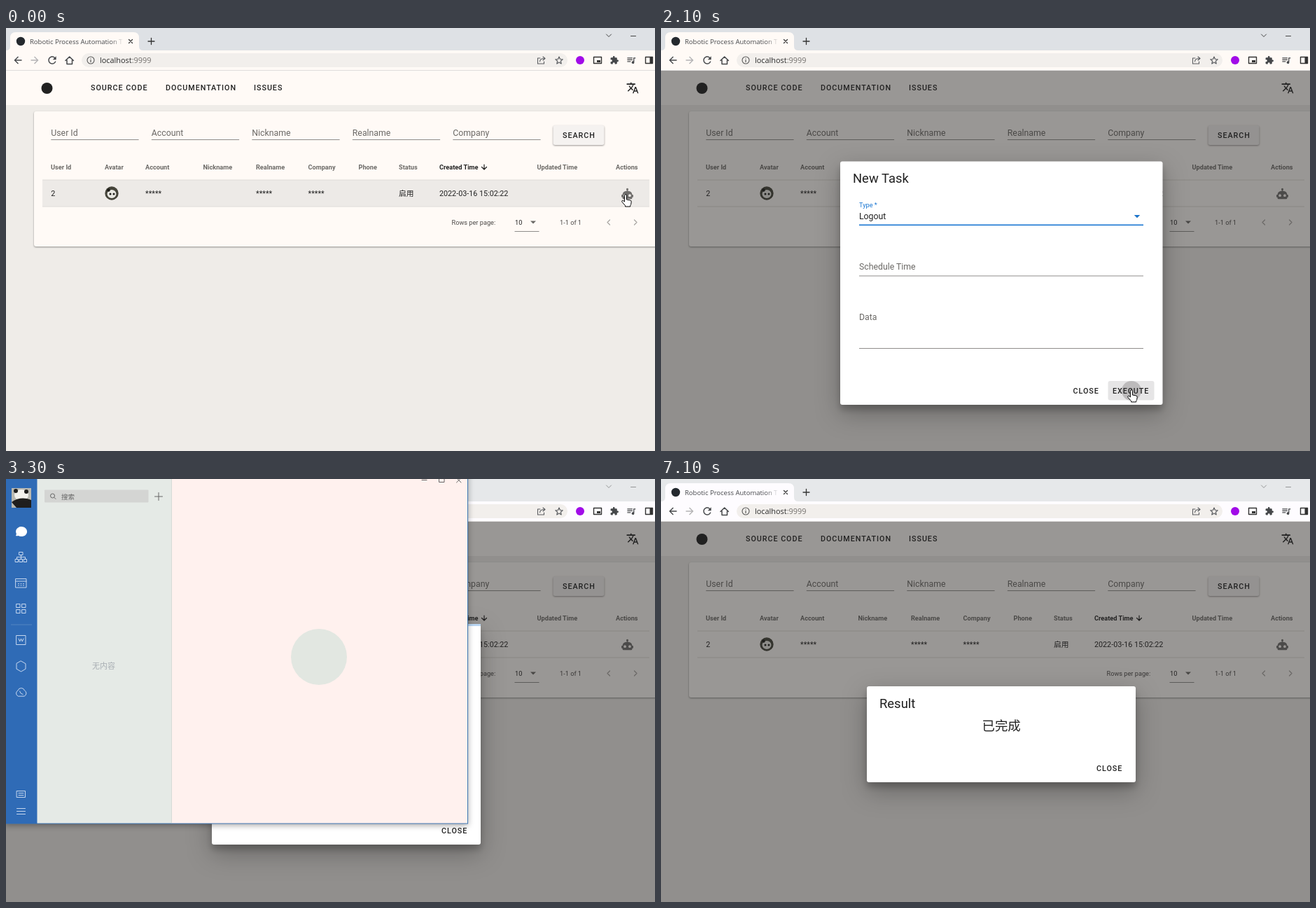
Write an HTML page that moves like this. It is 927 px wide and 604 px high and loops after 7.2 s.

```html
<!DOCTYPE html>
<html lang="en">
<head>
<meta charset="utf-8">
<title>Task console</title>
<style>
  html, body { margin: 0; width: 100%; height: 100%; overflow: hidden; }
  svg { display: block; width: 927px; height: 604px; font-family: Roboto, 'Noto Sans CJK SC', 'Noto Sans CJK', sans-serif; }
  text { white-space: pre; }
  .ui { font-family: 'Open Sans', 'Noto Sans', sans-serif; }
  .btn { font-weight: 500; letter-spacing: .0893em; }
  .line { fill: none; stroke-linecap: round; stroke-linejoin: round; }
  .card { filter: drop-shadow(0 1px 1px rgba(0,0,0,.4)); }
  .dialog { filter: drop-shadow(0 7px 5px rgba(0,0,0,.2)) drop-shadow(0 11px 17px rgba(0,0,0,.28)); }
  .menu { filter: drop-shadow(0 2px 3px rgba(0,0,0,.3)); }
  .window { filter: drop-shadow(0 2px 4px rgba(0,0,0,.35)); }
</style>
</head>
<body>
<svg id="stage" viewBox="0 0 927 604"></svg>
<script>
const INK = '#212121', SOFT = '#6b6966', RULE = '#8f8d8b', BLUE = '#1976d2';
const paths = {
  back: 'M20 11H7.83l5.59-5.59L12 4l-8 8 8 8 1.41-1.41L7.83 13H20z',
  reload: 'M17.65 6.35C16.2 4.9 14.21 4 12 4c-4.42 0-7.99 3.58-7.99 8s3.57 8 7.99 8c3.73 0 6.84-2.55 7.73-6h-2.08c-.82 2.33-3.04 4-5.65 4-3.31 0-6-2.69-6-6s2.69-6 6-6c1.66 0 3.14.69 4.22 1.78L13 11h7V4z',
  puzzle: 'M20.5 11H19V7c0-1.1-.9-2-2-2h-4V3.5a2.5 2.5 0 0 0-5 0V5H4c-1.1 0-2 .9-2 2v3.8h1.5a2.7 2.7 0 0 1 0 5.4H2V20c0 1.1.9 2 2 2h3.8v-1.5a2.7 2.7 0 0 1 5.4 0V22H17c1.1 0 2-.9 2-2v-4h1.5a2.5 2.5 0 0 0 0-5z',
  queue: 'M15 6H3v2h12zm0 4H3v2h12zM3 16h8v-2H3zM17 6v8.18a3 3 0 1 0 2 2.82V8h3V6z',
  translate: 'M12.87 15.07l-2.54-2.51.03-.03c1.74-1.94 2.98-4.17 3.71-6.53H17V4h-7V2H8v2H1v1.99h11.17C11.5 7.92 10.44 9.75 9 11.35 8.07 10.32 7.3 9.19 6.69 8h-2c.73 1.63 1.73 3.17 2.98 4.56l-5.09 5.02L4 19l5-5 3.11 3.11zM18.5 10h-2L12 22h2l1.12-3h4.75L21 22h2zm-2.62 7l1.62-4.33L19.12 17z',
  robot: 'M12 2a2 2 0 0 1 1 3.73V7h1a7 7 0 0 1 7 7h1a1 1 0 0 1 1 1v3a1 1 0 0 1-1 1h-1v1a2 2 0 0 1-2 2H5a2 2 0 0 1-2-2v-1H2a1 1 0 0 1-1-1v-3a1 1 0 0 1 1-1h1a7 7 0 0 1 7-7h1V5.73A2 2 0 0 1 12 2M7.5 13a2.5 2.5 0 0 0 0 5 2.5 2.5 0 0 0 0-5m9 0a2.5 2.5 0 0 0 0 5 2.5 2.5 0 0 0 0-5'
};

const text = (x, y, s, size, fill = INK, extra = '') =>
  `<text x="${x}" y="${y}" font-size="${size}" fill="${fill}" ${extra}>${s}</text>`;
const button = (x, y, s, fill = INK, extra = '') => text(x, y, s, 10.75, fill, `class="btn" ${extra}`);
const rect = (x, y, w, h, fill, extra = '') =>
  `<rect x="${x}" y="${y}" width="${w}" height="${h}" fill="${fill}" ${extra}/>`;
const circle = (x, y, r, fill, extra = '') => `<circle cx="${x}" cy="${y}" r="${r}" fill="${fill}" ${extra}/>`;
const stroke = (d, color, width = 1, extra = '') =>
  `<path class="line" d="${d}" stroke="${color}" stroke-width="${width}" ${extra}/>`;
const icon = (name, x, y, size, fill = '#45474a', extra = '') =>
  `<path d="${paths[name]}" fill="${fill}" transform="translate(${x} ${y}) scale(${size / 24}) ${extra} translate(-12 -12)"/>`;
const arrowDown = (x, y, fill, extra = '') => `<path d="M${x - 4} ${y - 2}h8l-4 4z" fill="${fill}" ${extra}/>`;
const group = (id, body) => `<g id="${id}">${body}</g>`;

const browser = () => rect(0, 0, 927, 33, '#dee1e5', 'id="strip"') +
  `<g id="bar" fill="#fffaf6"><path d="M0 32q6 0 6-6V14q0-8 8-8h168q8 0 8 8v12q0 6 6 6h731v29H0z"/></g>` +
  rect(0, 60, 927, 1, '#dedcdb') +
  circle(21, 19, 6.2, '#24292e') +
  text(34, 23, 'Robotic Process Automation T', 9.5, 'url(#titleFade)', 'class="ui"') +
  stroke('M175.500 16.500l5 5m0-5l-5 5', '#333', 1.2) + stroke('M203 19h9m-4.500-4.500v9', '#333', 1.3) +
  `<g id="caption">${stroke('M857.500 9l3.500 3.500 3.500-3.500M892.500 11.500h7', '#444')}</g>` +
  icon('back', 17, 46, 16.5) + icon('back', 41, 46, 16.5, '#b4b3b5', 'scale(-1 1)') + icon('reload', 66, 46, 17) +
  stroke('M85 46.500l5.700-5.500 5.700 5.500M87 45.500v6h7.500v-6', '#45474a', 1.5) +
  rect(108, 36, 694, 20, '#f2efec', 'rx="10"') +
  circle(121, 46, 5, 'none', 'stroke="#555" stroke-width="1.1"') + stroke('M121 45.500v3M121 43.500v.1', '#555', 1.2) +
  text(134, 50, 'localhost<tspan fill="#74716e">:9999</tspan>', 10.9, '#2b2b2b', 'class="ui"') +
  stroke('M763 43h-3.500v8h9v-3M762.500 48q.5-4.500 6-4.500M767 41l3 2.500-3 2.500', '#5a5c60', 1.1) +
  stroke('M790 41l1.500 3.500 3.700.3-2.900 2.500.9 3.700-3.200-2-3.200 2 .9-3.700-2.900-2.500 3.700-.3z', '#5a5c60', 1.2) +
  circle(820, 46, 6, '#a10be8') +
  stroke('M839.500 41.500h11v9h-11z', '#333', 1.4) + rect(844, 46, 5, 3, '#333') +
  icon('puzzle', 869, 46, 13) + icon('queue', 893, 46, 15) +
  stroke('M913.500 41.500h10v9h-10z', '#333', 1.4) + rect(919.500, 41.500, 4, 9, '#333');

const fields = ['User Id', 'Account', 'Nickname', 'Realname', 'Company'];
const columns = { 'User Id': 64, Avatar: 141, Account: 199, Nickname: 281.5, Realname: 357, Company: 431.5,
  Phone: 503.5, Status: 561, 'Created Time': 619, 'Updated Time': 758.5, Actions: 871 };

const page = () => rect(0, 61, 927, 543, '#efece8') + rect(0, 61, 927, 49, '#fffaf6') +
  circle(58.500, 86, 8, INK) +
  button(121, 89, 'SOURCE CODE') + button(228, 89, 'DOCUMENTATION') + button(354, 89, 'ISSUES') +
  icon('translate', 895, 85.500, 18.4, INK) +
  rect(40, 119, 900, 193, '#fffaf6', 'rx="3" class="card"') +
  fields.map((name, i) => text(64.300 + i * 143.500, 153.500, name, 12.3, SOFT) +
    rect(64.300 + i * 143.500, 159, 125.300, 1, RULE)).join('') +
  rect(781.500, 139, 73, 28, '#f5f2f0', 'rx="3" class="card"') + button(795, 157, 'SEARCH') +
  Object.entries(columns).map(([name, x]) => text(x, 202, name, 9.2,
    name == 'Created Time' ? INK : SOFT, 'font-weight="700"')).join('') +
  stroke('M683 195v7m-3.500-3.500l3.500 3.500 3.500-3.500', INK, 1.2) +
  rect(52, 217, 867, 38, '#edeae7', 'id="rowHover"') + rect(52, 216.500, 867, 1, '#e0dddA') + rect(52, 254.500, 867, 1, '#e0ddda') +
  text(64.300, 240, '2', 10.75) +
  circle(151, 236, 9.700, '#45443a') + `<ellipse cx="151" cy="237" rx="6.500" ry="6" fill="#e9e8e2"/>` +
  circle(146.500, 231.500, 2.2, '#1c1b18') + circle(149, 237, 1.5, '#1c1b18') + circle(154, 237, 1.5, '#1c1b18') +
  [199, 357, 431.500].map(x => text(x, 240, '*****', 10.75)).join('') +
  text(561, 240, '启用', 10.75) + text(619, 240, '2022-03-16 15:02:22', 10.75) +
  icon('robot', 887.500, 236.500, 18.4, '#706e6c') +
  text(636.500, 280.500, 'Rows per page:', 9.2, '#4c4a49') + text(727, 280.500, '10', 9.2) + arrowDown(753, 277.500, '#6b6966') +
  rect(726.500, 290, 35, 1, RULE) + text(791, 280.500, '1-1 of 1', 9.2, '#4c4a49') +
  stroke('M862.500 274l-3.500 3.500 3.500 3.500M897.500 274l3.500 3.500-3.500 3.500', '#aaa7a4', 1.3);

const panel = (x, y, w, h) => rect(x, y, w, h, '#fff', 'rx="3" class="dialog"');
const newTask = () => panel(256, 190.500, 460.500, 347.500) + text(274, 221, 'New Task', 18.43) +
  [281, 353.500, 457].map(y => rect(283, y, 406, 1, RULE)).join('') +
  text(283, 273, 'Type *', 12.3, SOFT, 'id="label"') + arrowDown(680, 269, SOFT) +
  group('focus', text(283, 256, 'Type *', 9.2, BLUE) + rect(283, 280.500, 406, 1.6, BLUE) + arrowDown(680, 269, BLUE)) +
  text(283, 345, 'Schedule Time', 12.3, SOFT) + text(283, 417, 'Data', 12.3, SOFT) +
  text(283, 273, 'Logout', 12.3, INK, 'id="choice"') +
  group('press', rect(638.500, 504, 66, 27.500, '#e6e5e6', 'rx="3"') + circle(672, 518, 14, '#bcbabb', 'id="ripple"')) +
  button(588.500, 522, 'CLOSE') + button(645, 522, 'EXECUTE', INK, 'id="execute"');

const menu = () => rect(283, 256, 406, 197, '#fff', 'rx="3" class="menu"') + rect(283, 262, 406, 37, '#ededed') +
  ['Logout', 'Login', 'Send Private Messages', 'Send Group Messages', 'Add Contacts']
    .map((s, i) => text(295, 285.300 + i * 36.900, s, 12.3)).join('');

const bone = (x, y, w, h, r) => rect(x, y, w, h, '#e0e0e0', `rx="${r}"`) + rect(x, y, w, h, 'url(#sheen)', `rx="${r}"`);
const waiting = () => panel(294, 207, 384, 315) + rect(294, 207, 384, 3, '#bad6f2') +
  rect(294, 207, 0, 3, BLUE, 'id="shortBar"') + rect(294, 207, 0, 3, BLUE, 'id="longBar"') +
  text(312, 237.500, 'Waiting', 18.43) + bone(378.700, 251, 215, 154, 3) + bone(437.500, 417, 97, 18.500, 9.2) +
  button(622, 506, 'CLOSE');
const result = () => panel(294, 296, 384, 137) + text(312, 327, 'Result', 18.43) +
  text(458.500, 359, '已完成', 18.43) + button(622, 417, 'CLOSE');

const chat = () => rect(-2, -10, 662, 502.500, '#3f77b3', 'class="window"') + rect(0, -10, 44.500, 502, '#2f6bb6') +
  rect(44.500, -10, 192, 501.500, '#e5eae6') + rect(236, -10, 1, 501.500, '#d6dbd7') + rect(237, -10, 422, 501.500, '#fff1ee') +
  rect(8, 13, 28, 28, '#b9b9b2') + `<ellipse cx="22" cy="23" rx="10" ry="8" fill="#f2f1ec"/><path d="M8 33q13-9 28-3v11H15z" fill="#1f1e1d"/>` +
  circle(14, 17, 3, '#1f1e1d') + circle(29, 18, 3, '#1f1e1d') +
  rect(55, 15.500, 148.500, 18, '#d4d5d3', 'rx="1"') + circle(66.500, 24, 3, 'none', 'stroke="#666"') + stroke('M69 26.500l2 2', '#666') +
  text(79, 28.500, '搜索', 9.5, '#666') + stroke('M212.500 25h11m-5.500-5.500v11', '#666') +
  text(123, 271, '无内容', 11, '#a8aeb3') +
  circle(447, 254, 40, '#e2e7e1') +
  stroke('M594 1.500h7M618.500-3v7.500h7.500V-3M643.500-1.500l6.500 6.500m0-6.500l-6.500 6.500', '#666') +
  `<path d="M14 81q1-2 .8-3a8 7 0 1 1 3 3q-2 .5-3.800 0z" fill="#fff"/>` +
  stroke('M19 104.500h5v4h-5zM21.500 108.500v3M15.500 114v-2.500h12v2.500M21.500 111.500v2.500M13.500 114.500h4v4h-4zM19.500 114.500h4v4h-4zM25.500 114.500h4v4h-4z' +
    'M14 142.500h15v12.500h-15zM14 146h15M17.500 149.500h1m2.500 0h1m2.500 0h1M17.500 152h1m2.500 0h1m2.500 0h1' +
    'M15 178.500h5v5h-5zM23 178.500h5v5h-5zM15 186.500h5v5h-5zM23 186.500h5v5h-5z' +
    'M15 223.500h13v13h-13zM18 228l1.700 4 1.800-4 1.800 4 1.700-4M21.500 260l6.500 3.700v7.500l-6.500 3.800-6.500-3.800v-7.500z' +
    'M17 310a4.500 4.500 0 0 1 0-8 5 5 0 0 1 9.500 0 4.500 4.500 0 0 1 0 8zM19.500 303q1 4 4.500 4.500' +
    'M15.500 445.500h12v9h-12zM18 448.500h7M18 451.500h7M15.500 470.500h12M15.500 474.500h12M15.500 478.500h12', '#d7e4f5', .9) +
  rect(7, 207.500, 30, 1, '#5486c4');

const hand = 'M-1.600 10V1.200a1.500 1.500 0 0 1 3 0V7l5 .9q1.900.4 1.800 2.300l-.5 3.300q-.3 1.200-1 2V17H-.5v-1.500Q-3 13-5 10.300q-.8-1.300.3-1.900 1.200-.5 3.100 1.600z';
const arrow = 'M0 0V12l2.800-2.600 2 4.500 2-.9-2-4.400H8.500z';
const stage = document.getElementById('stage');
stage.innerHTML = `<defs>
  <linearGradient id="sheen"><stop stop-color="#fff" stop-opacity="0"/><stop offset=".5" stop-color="#fff" stop-opacity=".3"/><stop offset="1" stop-color="#fff" stop-opacity="0"/></linearGradient>
  <linearGradient id="titleFade" gradientUnits="userSpaceOnUse" x1="150" x2="168" y1="0" y2="0"><stop stop-color="#45474a"/><stop offset="1" stop-color="#45474a" stop-opacity="0"/></linearGradient></defs>` +
  group('page', page()) + browser() + rect(0, 61, 927, 543, '#212121', 'id="scrim"') +
  group('newTask', newTask()) + group('menu', menu()) + group('waiting', waiting()) + group('result', result()) + group('chat', chat()) +
  '<path id="cursor" fill="#fff" stroke="#000" stroke-linejoin="round"/>';

const $ = id => document.getElementById(id);
const set = (id, attrs) => Object.entries(attrs).forEach(([k, v]) => $(id).setAttribute(k, v));
const fade = (id, a) => set(id, { opacity: a, display: a > 0 ? 'inline' : 'none' });
const clamp = v => Math.min(1, Math.max(0, v));
const mix = (a, b, k) => a + (b - a) * k;

const bezier = (x1, y1, x2, y2) => x => {
  const at = (a, b, s) => 3 * a * s * (1 - s) ** 2 + 3 * b * s * s * (1 - s) + s ** 3;
  let lo = 0, hi = 1;
  for (let i = 0; i < 24; i++) {
    const mid = (lo + hi) / 2;
    if (at(x1, x2, mid) < clamp(x)) lo = mid; else hi = mid;
  }
  return at(y1, y2, hi);
};
const ease = bezier(.25, .1, .25, 1), swift = bezier(.25, .8, .25, 1);
const grow = (t, start) => swift((t - start) / 300);

function dialog(id, k) {
  fade(id, k);
  set(id, { transform: `translate(486.2 364.3) scale(${mix(.5, 1, k)}) translate(-486.2 -364.3)` });
}

function progressBar(id, left, right) {
  const a = clamp(left), b = clamp(right);
  set(id, { x: 294 + 384 * a, width: Math.max(0, b - a) * 384 });
}

const track = [[200, 885, 238], [300, 800, 243], [400, 620, 255], [500, 470, 264], [600, 410, 270], [700, 400, 272],
  [1500, 400, 272], [1600, 405, 288], [1700, 437, 341], [1800, 565, 416], [1900, 638, 485], [2000, 668, 513], [2100, 672, 517]];
function moveCursor(t) {
  const i = track.findIndex(p => p[0] >= t);
  const b = track[i < 0 ? track.length - 1 : i], a = track[Math.max(0, i - 1)];
  const k = i > 0 ? (t - a[0]) / (b[0] - a[0]) : 1;
  const pointing = t < 100 || (t >= 600 && t < 1800) || t >= 2000;
  set('cursor', { d: pointing ? hand : arrow, transform: `translate(${mix(a[1], b[1], k)} ${mix(a[2], b[2], k)})` });
  fade('cursor', t < 2300 ? 1 : 0);
}

function render(t) {
  const task = grow(t, 35) * (1 - grow(t, 2150));
  const wait = grow(t, 2265);
  const away = t >= 2700;

  set('strip', { fill: away ? '#e6e8ea' : '#dee1e5' });
  set('bar', { fill: t < 2300 ? '#fffaf6' : '#fefcff' });
  fade('caption', (away && t < 5200) || t >= 7100 ? .5 : 1);
  fade('rowHover', t < 100 ? 1 : 0);
  fade('scrim', .46 * Math.max(task, wait));

  dialog('newTask', t < 35 ? 0 : task);
  fade('label', t < 900 ? 1 : 0);
  fade('focus', t >= 900 ? 1 : 0);
  fade('choice', t >= 1500 ? 1 : 0);
  set('execute', { fill: t >= 1500 ? INK : '#bdbdbd' });
  fade('press', t >= 2000 ? 1 : 0);
  set('ripple', { r: t < 2100 ? 0 : t < 2200 ? 14 : 26 });
  fade('menu', grow(t, 870) * (1 - grow(t, 1470)));

  dialog('waiting', t < 6100 ? wait : 0);
  const clock = Math.max(0, 125 + (t - 2400) * 1.095);
  const phase = clock % 2200 / 2200;
  const s = ease(phase / .6), l = ease((phase - .6) / .4);
  progressBar('shortBar', mix(-2, 1.07, s), mix(0, 1.08, s));
  progressBar('longBar', mix(-.9, 1, l), mix(0, 1.35, l));
  set('sheen', { gradientTransform: `translate(${mix(-1, 1, ease(clock % 1500 / 1500))} 0)` });
  fade('result', t >= 6100 ? 1 : 0);

  fade('chat', clamp((t - 2640) / 120) * clamp((5180 - t) / 120));
  moveCursor(t);
}

const start = performance.now();
function tick() {
  const t = (performance.now() - start) % 7200;
  render(Math.floor(t / 100) * 100);
  requestAnimationFrame(tick);
}
tick();
</script>
</body>
</html>
```
